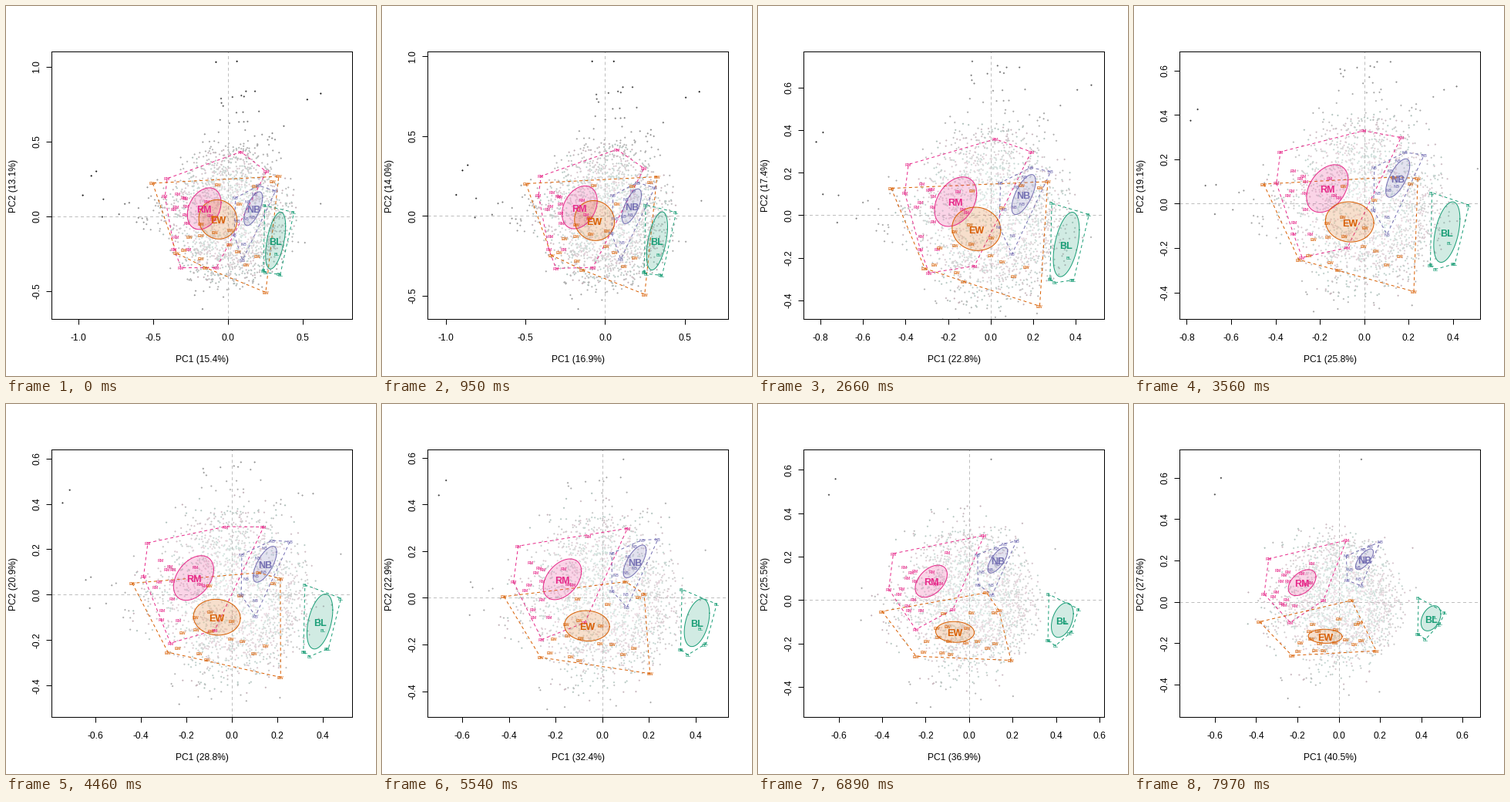
These frames come from a looping animation (480 by 480 pixels, 8 s). A matplotlib script:

```python
import numpy as np
import matplotlib.pyplot as plt
from matplotlib.animation import FuncAnimation

SIZE, DPI = 480, 96
PX = 72 / DPI                      # one pixel in points
LOOP, INTERVAL = 8000, 40
HOLD, STEP, STEPS = 500, 90, 84    # first pose, then one step each 90 ms
LEFT, RIGHT, TOP, BOTTOM = 59, 449, 59, 406
WIDTH, HEIGHT = RIGHT - LEFT, BOTTOM - TOP
DASH = (0, (4, 3.5))
ANGLES = np.linspace(0, 2 * np.pi, 80)

plt.rcParams.update({"font.family": "Liberation Sans", "font.size": 12 * PX,
                     "axes.linewidth": PX})
rng = np.random.default_rng(7)


def lerp(ends, p):
    return ends[0] + (ends[1] - ends[0]) * p


def drifts(rows):
    """Rows of x0, y0, x1, y1 in hundredths as (start points, end points)."""
    return np.array(rows).reshape(-1, 2, 2).swapaxes(0, 1) / 100


def hull(points):
    """Convex hull by monotone chain, closed."""
    def half(pts):
        out = []
        for p in pts:
            while len(out) > 1 and ((out[-1][0] - out[-2][0]) * (p[1] - out[-2][1])
                                    <= (out[-1][1] - out[-2][1]) * (p[0] - out[-2][0])):
                out.pop()
            out.append(p)
        return out
    pts = sorted(map(tuple, points))
    return np.array(half(pts)[:-1] + half(pts[::-1]))


def make_cloud():
    """Round core plus thin tails to the west, north and south."""
    def tail(count, x0, y0, x1, y1):
        n = rng.normal(size=count)
        e = np.minimum(rng.exponential(size=count), 3.5)
        return np.array([np.column_stack((x0(n, e), y0(n, e))),
                         np.column_stack((x1(n, e), y1(n, e)))])

    count = 1900
    radius, angle = 2 * np.sqrt(rng.random(count)), rng.uniform(0, 2 * np.pi, count)
    z = np.column_stack((radius * np.cos(angle), radius * np.sin(angle)))
    z += rng.normal(scale=.4, size=z.shape)
    turned = z @ [[.88, .48], [-.48, .88]]
    core = np.array([z * (.18, .195) + (.02, 0), turned * (.128, .132) + (.01, 0)])
    west = tail(35, lambda n, e: -.42 - .12 * e, lambda n, e: .04 + .1 * n,
                lambda n, e: -.3 - .04 * e, lambda n, e: -.05 + .13 * n)
    north = tail(65, lambda n, e: .1 + .13 * n, lambda n, e: .38 + .13 * e,
                 lambda n, e: -.05 + .13 * n, lambda n, e: .26 + .03 * e)
    south = tail(25, lambda n, e: -.05 + .13 * n, lambda n, e: -.38 - .04 * e,
                 lambda n, e: -.08 + .13 * n, lambda n, e: -.32 - .05 * e)
    return np.concatenate((core, west, north, south), axis=1)


# Far points that, with the groups, set the limits of the view
EXTREMES = drifts([
    (-97, 14, -36, 0), (-91.3, 27, -60, 52), (-88, 30, -57, 60),
    (62, 82, 13, 12), (53, 78, 12, 14), (6, 103.5, -3, -8), (-8, 103, -10, 0),
    (5, 39, 11, 69), (-17, -62, -15, -2), (-10, -38, -19, -51)])


class Group:
    def __init__(self, ax, name, color, inner, ellipse, corners):
        corners = drifts(corners)
        mix = rng.dirichlet(np.full(corners.shape[1], .5), inner)
        self.samples = np.concatenate((corners, mix @ corners), axis=1)
        self.ellipse = np.array(ellipse) / 100
        self.outline, = ax.plot([], [], color=color, lw=PX, ls=DASH, zorder=3)
        self.fill, = ax.fill([0, 0, 0], [0, 0, 0], fc=color, alpha=.2, lw=0, zorder=4)
        self.edge, = ax.plot([], [], color=color, lw=PX, zorder=5)

        def label(size, drop, **style):
            return ax.annotate(name, (0, 0), (0, -drop * PX), textcoords="offset points",
                               size=size * PX, color=color, weight="bold",
                               ha="center", va="center", **style)
        self.marks = [label(5.4, 1, alpha=.85, zorder=6) for _ in self.samples[0]]
        self.title = label(12.5, 2.5, zorder=7)

    def pose(self, p):
        points = lerp(self.samples, p)
        self.outline.set_data(*hull(points).T)
        for mark, point in zip(self.marks, points):
            mark.xy = point
        cx, cy, rx, ry, rho = lerp(self.ellipse, p)
        curve = np.column_stack((cx + rx * np.cos(ANGLES),
                                 cy + ry * np.sin(ANGLES + np.arcsin(rho))))
        self.fill.set_xy(curve)
        self.edge.set_data(*curve.T)
        self.title.xy = cx, cy


fig = plt.figure(figsize=(SIZE / DPI, SIZE / DPI), dpi=DPI, facecolor="white")
ax = fig.add_axes([LEFT / SIZE, 1 - BOTTOM / SIZE, WIDTH / SIZE, HEIGHT / SIZE])
ax.tick_params(length=7 * PX, width=PX)
ax.tick_params(axis="x", pad=12 * PX)
ax.tick_params(axis="y", pad=6 * PX, labelrotation=90)
x_title = fig.text(254.5 / SIZE, 1 - 459 / SIZE, "", ha="center", va="center")
y_title = fig.text(10.5 / SIZE, 1 - 233 / SIZE, "", ha="center", va="center", rotation=90)

cloud = np.concatenate((make_cloud(), EXTREMES), axis=1)
tints = np.array([(0, 0, 0), (.05, -.02, .01), (-.04, .03, .01)])[
    rng.integers(0, 3, cloud.shape[1])]
dots = ax.scatter(*cloud[0].T, s=(1.9 * PX) ** 2, marker="D", linewidths=0, zorder=1)
ax.axhline(0, color="#bebebe", lw=PX, ls=DASH, zorder=2)
ax.axvline(0, color="#bebebe", lw=PX, ls=DASH, zorder=2)

# Ellipse at start and end: centre, half width, half height, correlation (hundredths)
groups = [
    Group(ax, "RM", "#E7298A", 13,
          [(-15.9, 5.1, 11.3, 13.9, 30), (-17.7, 9.3, 6.7, 6.3, 45)],
          [(8.7, 43.1, -13, 18.6), (25.7, 29.8, 3.7, 29.8), (-40.6, 25.2, -33.9, 20.8),
           (-42.1, 13.3, -36.1, 3.7), (-35.9, -22.1, -26.4, -1.5),
           (-31.3, -34.4, -23.4, -10), (-7.7, -34.4, -7.4, .7)]),
    Group(ax, "EW", "#D95F02", 15,
          [(-6.7, -2.1, 12.8, 13.1, -5), (-6.5, -16.7, 8.2, 3.4, -5)],
          [(-50.3, 22.1, -38.3, -9.7), (33.9, 26.7, 10.4, -10), (18, 20, 6.3, .7),
           (25.2, -50.8, 18.2, -23.8), (-14.9, -34.4, -7.4, -23.4),
           (-34.4, -24.6, -22.7, -26)]),
    Group(ax, "NB", "#7570B3", 6,
          [(16.9, 5.1, 6.2, 11.3, 65), (12.5, 20.6, 4.3, 5, 70)],
          [(31.8, 16.9, 20.1, 29), (20.5, 20.5, 15.3, 26.8), (5.1, 12.3, 3.7, 22.3),
           (4.1, -12.3, 4.1, 10.4), (9.8, -29.3, 10.8, 7.8)]),
    Group(ax, "BL", "#1B9E77", 3,
          [(31.8, -16.2, 6.7, 19, 50), (44.7, -8, 4.8, 6.1, 35)],
          [(24.6, 7.2, 38.7, 1.9), (44.1, 2.6, 51.4, -5.2), (34.9, -39, 49.1, -10.4),
           (23.6, -36.4, 38.3, -15.6), (25.2, -37.5, 42.1, -18.2)]),
]
bounds = np.concatenate([EXTREMES] + [g.samples for g in groups], axis=1)


def view(p):
    """Limits that hold all bounds with a 4% margin at equal scale."""
    points = lerp(bounds, p)
    low, high = points.min(0), points.max(0)
    unit = (1.08 * (high - low) / (WIDTH, HEIGHT)).max()
    half = unit * np.array((WIDTH, HEIGHT)) / 2
    centre = (low + high) / 2
    return zip(centre - half, centre + half)


def ticks(lo, hi):
    step = .5 if hi - lo > 1.556 else .2
    values = [i * step for i in range(int(np.ceil(lo / step)), int(np.floor(hi / step)) + 1)]
    return values, [f"{v:.1f}" for v in values]


def update(frame):
    time = (frame + .5) * INTERVAL
    step = 0 if time < HOLD else int((time - HOLD) // STEP) + 1
    p = step / STEPS

    xlim, ylim = view(p)
    ax.set_xticks(*ticks(*xlim))
    ax.set_yticks(*ticks(*ylim), va="center")
    ax.set(xlim=xlim, ylim=ylim)
    x_title.set_text(f"PC1 ({lerp((15.38, 40.46), p):.1f}%)")
    y_title.set_text(f"PC2 ({lerp((13.1, 27.6), p):.1f}%)")

    points = lerp(cloud, p)
    grey = np.clip(.89 - .9 * (points ** 2).sum(1), .1, 1)[:, None]
    dots.set_offsets(points)
    dots.set_facecolor(np.clip(grey + tints * (grey > .7), 0, 1))
    for group in groups:
        group.pose(p)
    return []


anim = FuncAnimation(fig, update, frames=LOOP // INTERVAL, interval=INTERVAL,
                     init_func=lambda: update(0), repeat=True, repeat_delay=0)
plt.show()
```
